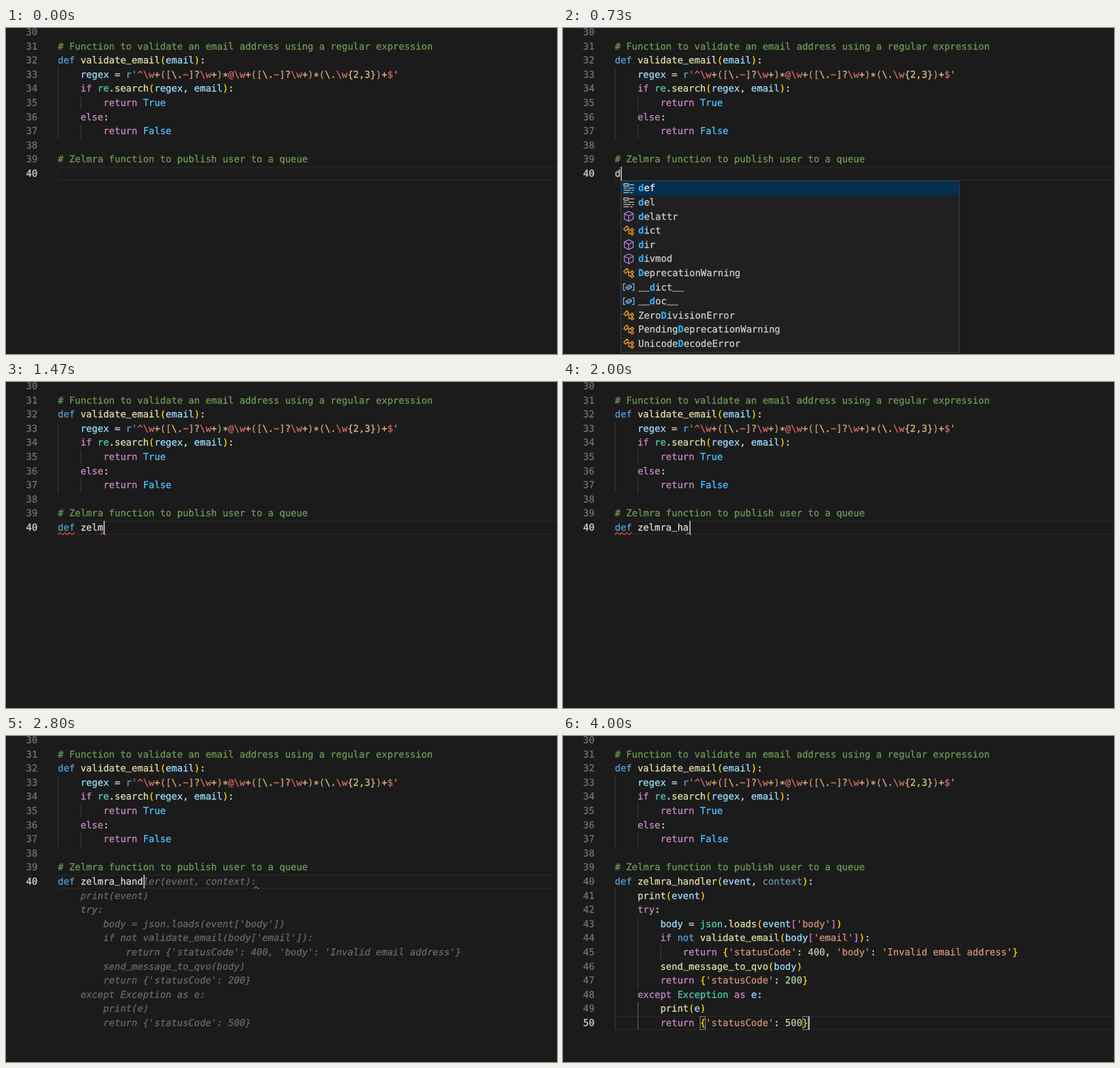
An HTML page with a canvas for the animation above (4.07 s loop, 842 by 498 pixels).

```html
<!DOCTYPE html>
<html lang="en">
<head>
<meta charset="utf-8">
<title>Code completion</title>
<style>
html, body { margin: 0; width: 842px; height: 498px; overflow: hidden; background: #1b1b1b; }
canvas { display: block; }
</style>
</head>
<body>
<canvas id="stage" width="842" height="498"></canvas>
<script>
const ctx = document.getElementById('stage').getContext('2d');
const LOOP = 4070, LEFT = 79.2, CHAR = 8.68, LINE = 21.59;
const SIZE = '14.4px "DejaVu Sans Mono", monospace';
const CUE = { popup: 730, keyword: 870, squiggle: 1330, ghost: 2330, accept: 3330, semantic: 3530, unused: 3670 };
const BLINK = 267;

const COLORS = {
  w: '#d8d8d8', c: '#6a9955', b: '#569cd6', f: '#dcdcaa', v: '#9cdcfe', k: '#c586c0',
  t: '#4ec9b0', l: '#4fc1ff', y: '#ffd700', p: '#da70d6', s: '#ce9178', n: '#b5cea8',
  r: '#d16969', q: '#d7ba7d'
};

// "~x" switches to colour x; u, m and x change once semantic colours arrive.
const ATOM = "~r\\w~q+~s([~q\\.~r-~s]~q?~r\\w~q+~s)~q*";
const TOP = [
  '',
  '~c# Function to validate an email address using a regular expression',
  '~bdef ~fvalidate_email~y(~vemail~y)~w:',
  "    ~vregex ~w= ~br~r'^" + ATOM + '~r@' + ATOM + "~s(~q\\.~r\\w~q{2,3}~s)~q+~r$~s'",
  '    ~kif ~tre~w.~fsearch~y(~vregex~w, ~vemail~y)~w:',
  '        ~kreturn ~lTrue',
  '    ~kelse~w:',
  '        ~kreturn ~lFalse',
  '',
  '~c# Zelmra function to publish user to a queue'
];
const HANDLER = [
  '~bdef ~fzelmra_handler~y(~vevent~w, ~xcontext~y)~w:',
  '    ~fprint~y(~uevent~y)',
  '    ~ktry~w:',
  "        ~ubody ~w= ~mjson~w.~floads~y(~uevent~p[~s'body'~p]~y)",
  "        ~kif ~bnot ~fvalidate_email~y(~ubody~p[~s'email'~p]~y)~w:",
  "            ~kreturn ~y{~s'statusCode'~w: ~n400~w, ~s'body'~w: ~s'Invalid email address'~y}",
  '        ~fsend_message_to_qvo~y(~ubody~y)',
  "        ~kreturn ~y{~s'statusCode'~w: ~n200~y}",
  '    ~kexcept ~tException ~kas ~ue~w:',
  '        ~fprint~y(~ue~y)',
  "        ~kreturn ~y{~s'statusCode'~w: ~n500~y}"
];
const TYPED = 'def zelmra_hand';
const SUGGESTIONS = [
  ['keyword', 'def'], ['keyword', 'del'], ['cube', 'delattr'], ['type', 'dict'],
  ['cube', 'dir'], ['cube', 'divmod'], ['type', 'DeprecationWarning'],
  ['value', '__dict__'], ['value', '__doc__'], ['type', 'ZeroDivisionError'],
  ['type', 'PendingDeprecationWarning'], ['type', 'UnicodeDecodeError']
];
// Wider dash and vertically centred asterisk.
const GLYPHS = { '-': '\u2212', '*': '\u2217' };

const colX = col => LEFT + col * CHAR;
const baseline = line => 227 + (line - 40) * LINE;
const rowTop = line => Math.round(baseline(line) - 15.2);
const plain = markup => markup.replace(/~./g, '');

function rect(x, y, w, h, color) {
  ctx.fillStyle = color;
  ctx.fillRect(x, y, w, h);
}

function frame(x, y, w, h, color) {
  ctx.strokeStyle = color;
  ctx.lineWidth = 1;
  ctx.strokeRect(x + .5, y + .5, w - 1, h - 1);
}

function path(color, width, points, close) {
  ctx.strokeStyle = color;
  ctx.lineWidth = width;
  ctx.beginPath();
  points.forEach(([x, y]) => ctx.lineTo(x, y));
  if (close) ctx.closePath();
  ctx.stroke();
}

// A hairline outline gives the strokes a slightly heavier weight.
function text(str, x, y, color, style = '') {
  ctx.font = style + ' ' + SIZE;
  ctx.fillStyle = ctx.strokeStyle = color;
  ctx.lineWidth = .3;
  [...str].forEach((ch, i) => {
    if (ch === ' ') return;
    const glyph = GLYPHS[ch] || ch, left = x + i * CHAR, base = ch === '_' ? y - 2 : y;
    ctx.fillText(glyph, left, base);
    ctx.strokeText(glyph, left, base);
  });
}

function code(markup, line, t) {
  const colors = {
    ...COLORS,
    u: t >= CUE.semantic ? COLORS.v : COLORS.w,
    m: t >= CUE.semantic ? COLORS.t : COLORS.w,
    x: t >= CUE.unused ? '#6893a9' : COLORS.v
  };
  let col = 0;
  markup.split('~').forEach((part, i) => {
    const str = i ? part.slice(1) : part;
    text(str, colX(col), baseline(line), i ? colors[part[0]] : COLORS.w);
    col += str.length;
  });
}

function guide(col, first, last, color = '#3b3b3b') {
  const y = rowTop(first);
  rect(Math.round(colX(col)), y, 1, rowTop(last + 1) - y, color);
}

function squiggle(x1, x2, line) {
  const mid = baseline(line) + 4.7, points = [];
  for (let x = x1; x <= x2; x += .6) {
    points.push([x, mid + 1.5 * Math.cos((x - x1) * Math.PI * 2 / 7.2)]);
  }
  path('#e5484a', 1.3, points);
}

function lineNumbers(last, active) {
  for (let n = 30; n <= last; n++) {
    text(String(n), 30.8, baseline(n), n === active ? '#d4d4d4' : '#6e7278');
  }
}

function currentLine(line) {
  frame(79, rowTop(line), 770, 21, '#292929');
}

function cursor(col, line) {
  rect(Math.round(colX(col) + .6), rowTop(line), 2, 21, '#a8a9a7');
}

const ICONS = {
  keyword() {
    const c = '#c5c5c5';
    ctx.strokeStyle = c;
    ctx.lineWidth = 1.3;
    ctx.strokeRect(-7.5, -6.5, 7, 3.5);
    [[1, 8, -5], [-8, -3, 0], [-1, 8, 0], [-8, 3, 3.5], [5, 8, 3.5], [-8, 0, 7], [2, 6, 7]]
      .forEach(([a, b, y]) => path(c, 1.3, [[a, y], [b, y]]));
  },
  cube() {
    const c = '#b180d7';
    path(c, 1.3, [[0, -7.5], [6.8, -4], [6.8, 4], [0, 7.5], [-6.8, 4], [-6.8, -4]], true);
    path(c, 1.3, [[-6.8, -4], [0, -.5], [6.8, -4]]);
    path(c, 1.3, [[0, -.5], [0, 7.5]]);
  },
  type() {
    const c = '#ee9d28';
    const diamond = (x, y, r) => path(c, 1.4, [[x, y - r], [x + r, y], [x, y + r], [x - r, y]], true);
    path(c, 1.4, [[-7.5, -2], [-3, -6.8], [-.3, -4], [-5, 1]], true);
    path(c, 1.4, [[-2, -1.2], [3, -1.2]]);
    path(c, 1.4, [[0, -1.2], [0, 4.8], [3, 4.8]]);
    diamond(5.2, -1, 2.4);
    diamond(5.2, 4.8, 2.4);
  },
  value() {
    const c = '#75beff';
    [-1, 1].forEach(d => path(c, 1.3, [[d * 5, -5], [d * 8, -5], [d * 8, 5], [d * 5, 5]]));
    path(c, 1.3, [[-4, 0], [1, -3.2], [4, -1.5], [4, 1], [-1, 3.7], [-4, 2]], true);
    path(c, 1.1, [[-4, 0], [-1, 1.4], [4, -1.5]]);
  }
};

function popup() {
  rect(88, 233, 518, 263, '#202020');
  rect(89, 234, 516, 22, '#032f50');
  frame(88, 233, 518, 263, '#3d4043');
  SUGGESTIONS.forEach(([icon, word], i) => {
    const y = 244.5 + i * 21.6;
    ctx.save();
    ctx.translate(100.5, y);
    ICONS[icon]();
    ctx.restore();
    const hit = word.includes('D') ? word.indexOf('D') : word.indexOf('d');
    const base = y + 4.8, x = 115;
    text(word.slice(0, hit), x, base, '#cccccc');
    text(word[hit], x + hit * CHAR, base, '#2aaaff', 'bold');
    text(word.slice(hit + 1), x + (hit + 1) * CHAR, base, i ? '#cccccc' : '#f0f0f0');
  });
}

function typedCount(t) {
  if (t < 670) return 0;
  if (t < 800) return 1;
  if (t < CUE.keyword) return 2;
  return Math.min(TYPED.length, 3 + Math.floor((t - CUE.keyword) / 112));
}

function cursorOn(t) {
  if (t < 670) return t >= 270 && t < 530;
  if (t < 2265) return true;
  return Math.floor((t - 2265) / BLINK) % 2 === 0;
}

function drawTyping(t) {
  const count = typedCount(t), typed = TYPED.slice(0, count);
  const ghost = t >= CUE.ghost;
  const full = plain(HANDLER[0]);
  lineNumbers(40, 40);
  currentLine(40);
  code(t >= CUE.keyword ? '~b' + typed.slice(0, 3) + '~w' + typed.slice(3) : typed, 40, t);
  if (ghost) {
    HANDLER.forEach((markup, i) => {
      const from = i ? 0 : count;
      text(plain(markup).slice(from), colX(from), baseline(40 + i), '#686868', 'italic');
    });
  }
  if (t >= CUE.squiggle) {
    const end = colX(ghost ? full.length : count);
    squiggle(end - 4.5, end + 4, 40);
    if (!ghost) squiggle(LEFT, colX(3), 40);
  }
  if (cursorOn(t)) cursor(count, 40);
  if (t >= CUE.popup && t < CUE.keyword) popup();
}

function drawAccepted(t) {
  lineNumbers(50, 50);
  currentLine(50);
  guide(0, 41, 50);
  guide(4, 43, 47);
  guide(8, 45, 45);
  guide(4, 49, 50, '#666666');
  [15, 33].forEach(col => frame(Math.round(colX(col)), rowTop(50), 9, 21, '#858585'));
  HANDLER.forEach((markup, i) => code(markup, 40 + i, t));
  if (t < CUE.semantic) squiggle(colX(34) - 1, colX(34) + 4, 50);
  if (cursorOn(t)) cursor(34, 50);
}

function draw(now) {
  const t = Math.round(now) % LOOP;
  ctx.textRendering = 'geometricPrecision';
  ctx.lineJoin = 'round';
  rect(0, 0, 842, 498, '#1b1b1b');
  guide(0, 33, 37);
  guide(4, 35, 35);
  guide(4, 37, 37);
  TOP.forEach((markup, i) => code(markup, 30 + i, t));
  (t < CUE.accept ? drawTyping : drawAccepted)(t);
  requestAnimationFrame(draw);
}
requestAnimationFrame(draw);
</script>
</body>
</html>
```
